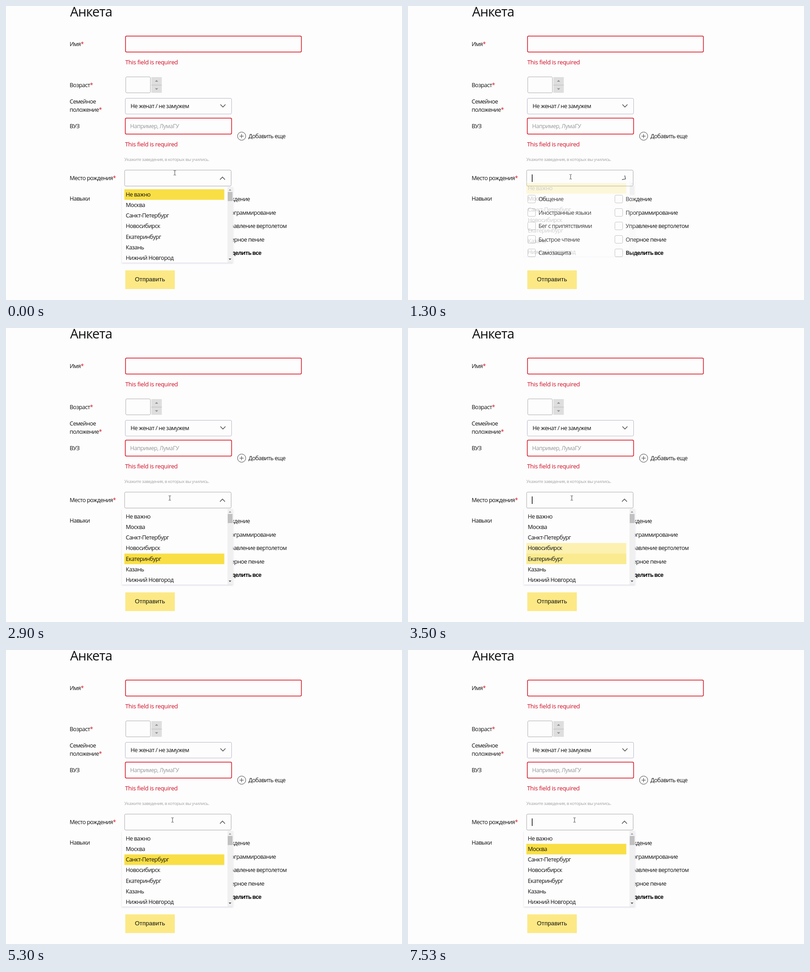
Write an HTML page that moves like this. It is 868 px wide and 645 px high and loops after 8000 ms.

```html
<!DOCTYPE html>
<html lang="ru">
<head>
<meta charset="utf-8">
<style>
html, body { margin: 0; width: 100%; height: 100%; overflow: hidden; background: #fdfdfd; }
svg { display: block; width: 868px; height: 645px; }
text { font: 12.6px "Open Sans", "Noto Sans", sans-serif; letter-spacing: -.045em; fill: #111; }
.title { font-size: 29px; letter-spacing: -.03em; }
.error { font-size: 13px; letter-spacing: -.025em; fill: #cf0a22; }
.hint { font-size: 9.7px; fill: #a3a3a3; }
.ghost { fill: #999; }
.bold { font-weight: 700; letter-spacing: -.065em; }
.button { font: 13.33px "Liberation Sans", Arial, sans-serif; letter-spacing: 0; }
.star { fill: #d9101f; }
.line { fill: none; stroke: #444; stroke-width: 1.3; }
</style>
</head>
<body>
<svg id="stage" viewBox="0 0 868 645"></svg>
<script>
const LOOP = 8000, FADE = 100, BLINK = 530, FOCUS = 1170, ROW = 23.22;
const cities = ['Не важно', 'Москва', 'Санкт-Петербург', 'Новосибирск', 'Екатеринбург', 'Казань', 'Нижний Новгород'];
const skills = [
  ['Общение', 'Вождение'],
  ['Иностранные языки', 'Программирование'],
  ['Бег с припятствиями', 'Управление вертолетом'],
  ['Быстрое чтение', 'Оперное пение'],
  ['Самозащита', 'Выделить все'],
];
// [time, highlighted row]
const keys = [
  [-200, 0], [2010, 1], [2170, 2], [2350, 3], [2770, 4], [3030, 5], [3250, 4], [3460, 3],
  [3720, 2], [4180, 1], [4390, 0], [4530, 1], [4760, 2], [4900, 3], [5020, 2],
  [5305, 3], [5425, 4], [5730, 3], [5980, 2], [7000, 1],
];
// [start, end, x, y] of pointer moves
const moves = [[330, 800, 356, 375], [1200, 1600, 359, 373], [3700, 4000, 365, 373]];

const text = (x, y, s, cls = '') => `<text x="${x}" y="${y}" class="${cls}">${s}</text>`;
const label = (y, s, star) => text(139.5, y, s + (star ? '<tspan class="star">*</tspan>' : ''));
const rect = (x, y, w, h, fill, extra = '') =>
  `<rect x="${x}" y="${y}" width="${w}" height="${h}" fill="${fill}" ${extra}/>`;
const field = (x, y, w, h, color, width = 1) =>
  rect(x, y, w, h, '#fdfdfd', `rx="2.5" stroke="${color}" stroke-width="${width}"`);
const shape = (d, fill) => `<path d="${d}" fill="${fill}"/>`;
const chevron = (x, y, id) =>
  `<g transform="translate(${x} ${y})"><path id="${id}" class="line" d="M-5.5-3L0 2.7L5.5-3"/></g>`;

const skillRow = (pair, i) => pair.map((s, col) => {
  const x = col ? 453.5 : 262.5, y = 423.5 + i * 29.5;
  return field(x, y - 8.5, 17, 17, '#b8b8b8') +
    text(col ? 477 : 286, y + 4.5, s, col && i === 4 ? 'bold' : '');
}).join('');

const menu = `<g id="menu">
  ${rect(254, 397, 243.5, 166, '#fdfdfd', 'filter="url(#shadow)"')}
  ${cities.map((s, i) => rect(259.5, 402 + i * ROW, 219, i === 6 ? 21.6 : ROW, '#f9df45', 'class="mark"') +
    text(262.5, 417.7 + i * ROW, s)).join('')}
  ${rect(485.5, 397, 12, 166, '#f0f0f0')}
  ${rect(486, 408, 10.5, 20, '#c1c1c1')}
  ${shape('M488 405l3-3.2l3 3.2z', '#999')}
  ${shape('M488 554l3 3.2l3-3.2z', '#505050')}
</g>`;

const $ = id => document.getElementById(id);
$('stage').innerHTML = `
  <filter id="shadow" x="-5%" y="-5%" width="110%" height="112%">
    <feDropShadow dx="0" dy="1.5" stdDeviation="1.8" flood-color="#8080b0" flood-opacity=".3"/>
  </filter>` +
  rect(0, 0, 868, 645, '#fdfdfd') +
  text(140.5, 22.5, 'Анкета', 'title') +
  label(88, 'Имя', 1) + field(262, 66, 385.5, 35, '#d9101f', 1.5) +
  text(261.5, 128.3, 'This field is required', 'error') +
  label(178, 'Возраст', 1) + field(262.5, 155.5, 54, 35, '#b0b0b0') +
  rect(318.5, 156, 23, 34.5, '#dedede') + rect(318.5, 173, 23, 1, '#bbb') +
  shape('M326.5 166l3.5-3.5l3.5 3.5z', '#8c8c8c') + shape('M326.5 180.5l3.5 3.5l3.5-3.5z', '#8c8c8c') +
  label(214, 'Семейное') + label(231.5, 'положение', 1) +
  field(261.5, 202.5, 233, 34.5, '#b7b7cb') + text(273, 224, 'Не женат / не замужем') +
  chevron(475.5, 219, 'arrow') +
  label(268, 'ВУЗ') + field(261.5, 246, 233, 35, '#d9101f', 1.5) +
  text(272, 268, 'Например, ЛумаГУ', 'ghost') +
  '<circle class="line" cx="516.5" cy="285.5" r="9" style="stroke-width:1"/>' +
  '<path class="line" d="M512 285.5h9M516.5 281v9" style="stroke-width:1"/>' +
  text(531.5, 290, 'Добавить еще') +
  text(261, 308, 'This field is required', 'error') +
  text(259.5, 340, 'Укажите заведения, в которых вы учились.', 'hint') +
  label(382, 'Место рождения', 1) + field(260, 360, 233.5, 35, '#a9a9a9') +
  chevron(474.5, 378, 'toggle') +
  label(427, 'Навыки') + skills.map(skillRow).join('') +
  rect(261.5, 580, 108.5, 41, '#fce986') + text(282.5, 604.3, 'Отправить', 'button') +
  menu + rect(271.5, 369.5, 1.5, 16.5, '#111', 'id="caret"') +
  '<path id="pointer" class="line" d="M-2.5-5H-.8L0-4.2L.8-5H2.5M0-4.2V4.2M-2.5 5H-.8L0 4.2L.8 5H2.5" style="stroke-width:1"/>';

const marks = [...document.querySelectorAll('.mark')];
const ramp = (t, a, b) => Math.min(1, Math.max(0, (t - a) / (b - a)));
const ease = p => p * p * (3 - 2 * p);

function draw(t) {
  // 0 = menu open, 1 = menu closed
  const closed = ease(ramp(t, 810, 1100)) - ease(ramp(t, 1190, 1490));
  $('menu').setAttribute('opacity', (1 - closed) ** 1.4);
  $('menu').setAttribute('transform', `translate(0 ${-19.5 * closed})`);
  $('toggle').setAttribute('transform', `rotate(${-180 * (1 - closed)})`);

  const n = keys.filter(k => k[0] <= t).length - 1;
  const p = ramp(t, keys[n][0], keys[n][0] + FADE);
  marks.forEach((m, i) => m.setAttribute('opacity',
    i === keys[n][1] ? p : n && i === keys[n - 1][1] ? 1 - p : 0));

  let x = 370, y = 366;
  for (const [a, b, tx, ty] of moves) {
    const q = ease(ramp(t, a, b));
    x += (tx - x) * q;
    y += (ty - y) * q;
  }
  $('pointer').setAttribute('transform', `translate(${x} ${y})`);

  const caretOn = t >= FOCUS && Math.floor((t - FOCUS) / BLINK) % 2 === 0;
  $('caret').setAttribute('opacity', caretOn ? 1 : 0);
}

const start = performance.now();
function tick() {
  draw((performance.now() - start) % LOOP);
  requestAnimationFrame(tick);
}
tick();
</script>
</body>
</html>
```
